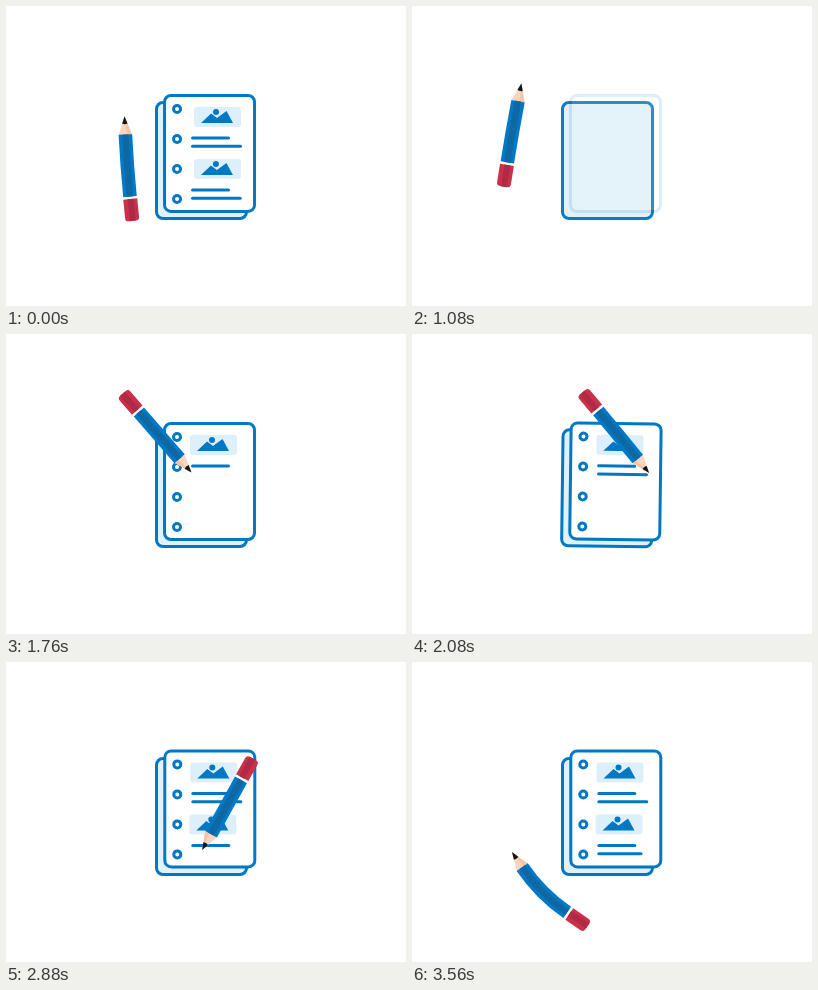
Recreate the animation shown at these times as an HTML page. Size 400 by 300 pixels, loop 3.6 s.

```html
<!DOCTYPE html>
<html lang="en">
<head>
<meta charset="utf-8">
<title>Pencil and notebook</title>
<style>
  html, body { margin: 0; width: 100%; height: 100%; overflow: hidden; background: #fff; }
  svg { display: block; width: 100vw; height: 100vh; }
  .ink { stroke: #0078c3; stroke-width: 3; }
  .line { stroke-linecap: round; }
</style>
</head>
<body>
<svg viewBox="0 0 400 300">
  <defs>
    <g id="picture">
      <rect width="47" height="20" rx="3" fill="#ddeffb"/>
      <path d="M7 16 L17 6.5 L23 11 L32.5 4 L39 16Z" fill="#0078c3"/>
      <circle cx="22" cy="5" r="3" fill="#0078c3"/>
    </g>
  </defs>
  <g id="notebook">
    <rect id="back" class="ink" x="150.5" y="96.5" width="90" height="116" rx="6.5" fill="#e0f1fa"/>
    <g id="front">
      <rect class="ink" x="158.5" y="89.5" width="90" height="116" rx="6.5" fill="#fff"/>
      <g id="holes" class="ink" fill="#fff"></g>
      <g id="pictures"></g>
      <g id="lines" class="ink line"></g>
    </g>
  </g>
  <g id="pencil">
    <g id="eraser">
      <rect x="-7" y="-1" width="14" height="4" fill="#fff"/>
      <path d="M-7 2.5 H7 V21 Q7 24.5 3.5 24.5 H-3.5 Q-7 24.5 -7 21Z" fill="#c9304a"/>
      <path d="M-2.5 2.5 H3.5 V24.5 H-2.5Z" fill="#b02a45"/>
    </g>
    <g id="tip">
      <path d="M-6.7 .4 L0 -18 L6.7 .4Z" fill="#fbd5bd"/>
      <path d="M2 .4 L0 -18 L6.7 .4Z" fill="#f3c4a8"/>
      <path d="M-2.7 -10.8 L0 -18.2 L2.7 -10.8 Q0 -9.8 -2.7 -10.8Z" fill="#151515"/>
    </g>
    <g id="body" fill="none">
      <path stroke="#0078c8" stroke-width="13.6"/>
      <path stroke="#1068a2" stroke-width="6.4"/>
    </g>
  </g>
</svg>
<script>
const LOOP = 3600, INTRO = 360, LEAVE = 3560;
const MARGIN = 186.5, NIB = 49, HALF = 31;

const $ = id => document.getElementById(id);
const place = (el, transform) => el.setAttribute('transform', transform);
const fade = (el, value) => el.setAttribute('opacity', value);
const radians = degrees => degrees * Math.PI / 180;

const ramp = (t, from, to) => Math.min(1, Math.max(0, (t - from) / (to - from)));
const easeIn = u => u * u;
const easeOut = u => 1 - (1 - u) ** 11;
const easeInOut = u => u < .5 ? 4 * u ** 3 : 1 - 4 * (1 - u) ** 3;
const between = (t, from, to) => easeInOut(ramp(t, from, to));

function add(parent, name, attrs) {
  const el = document.createElementNS('http://www.w3.org/2000/svg', name);
  for (const key in attrs) el.setAttribute(key, attrs[key]);
  return parent.appendChild(el);
}

const holes = [0, 1, 2, 3].map(i => add($('holes'), 'circle', { cx: 171, cy: 103 + 30 * i, r: 3.5 }));

// Each block is a picture with a short and a long line under it.
function makeBlock(index, start, angle, longEnd) {
  const top = 101 + 52 * index;
  const makeLine = (y, from, to, end) => ({
    y, from, to, end,
    el: add($('lines'), 'line', { x1: MARGIN, y1: y, y2: y })
  });
  return {
    top, start, angle,
    picture: add($('pictures'), 'use', { href: '#picture' }),
    lines: [
      makeLine(top + 31, start, start + 160, 222.5),
      makeLine(top + 39.4, start + 300, start + 500, longEnd)
    ]
  };
}
const blocks = [makeBlock(0, 1480, 139, 234.5), makeBlock(1, 2640, 209, 228.5)];

// A pose is [centre x, centre y, bearing, bend].
const write = (x, y, angle) =>
  [x - NIB * Math.sin(radians(angle)), y - 2 + NIB * Math.cos(radians(angle)), angle, 0];

const move = (from, to, pose, ease = easeInOut, swing = [0, 0, 0, 0]) => ({ from, to, pose, ease, swing });

function writeBlock({ lines: [short, long], angle }) {
  return [
    move(short.from, short.to, write(short.end, short.y, angle)),
    move(short.to, long.from, write(MARGIN - 1.5, long.y, angle)),
    move(long.from, long.to, write(long.end, long.y, angle))
  ];
}
const blockStart = ({ lines, angle }) => write(MARGIN - 1.5, lines[0].y, angle);

const [first, second] = blocks;
const moves = [
  move(520, 880, [100.5, 124, 0, 0]),
  move(940, first.start, blockStart(first), easeInOut, [-16, 18, 0, 8]),
  ...writeBlock(first),
  move(1980, 2620, blockStart(second), easeInOut, [72, -21, 10, 19]),
  ...writeBlock(second),
  move(3140, LEAVE, [133.3, 231.5, 313, 22], easeIn),
  move(LEAVE, 3800, [120, 149, 362, 0], easeOut)
];

function pencilPose(t) {
  let pose = [100.5, 131, 0, 0];
  for (const { from, to, pose: target, ease, swing } of moves) {
    if (t <= from) break;
    const k = ease(ramp(t, from, to)), arc = Math.sin(Math.PI * k);
    pose = pose.map((value, i) => value + (target[i] - value) * k + swing[i] * arc);
  }
  return pose;
}

function drawNotebook(t) {
  const settle = easeOut(ramp(t, LEAVE, 3800));
  const tilt = 12.4 * Math.sin(Math.PI * ramp(t, 2040, 2560)) ** 2;
  const nudge = ramp(t, 2500, 2560) * (1 - settle);

  place($('notebook'), `rotate(${tilt} 208 142)`);
  place($('front'), `translate(${nudge * .3} ${nudge * -.6})`);
  fade($('back'), ramp(t, 920, 1088));
  fade($('front'), ramp(t, 1060, 1220));
  holes.forEach((hole, i) => fade(hole, ramp(t, 1200 + i * 40, 1280 + i * 40)));

  blocks.forEach(({ picture, top, start, lines }, i) => {
    place(picture, `translate(${184 + 4.6 * settle - i * nudge} ${top})`);
    fade(picture, ramp(t, start - 80, start + 40));
    for (const { el, from, to, end } of lines) {
      const finish = end === second.lines[1].end ? end + 6.5 * settle : end;
      el.setAttribute('x2', MARGIN + (finish - MARGIN) * between(t, from, to));
      fade(el, t > from ? 1 : 0);
    }
  });
}

function drawPencil(t) {
  const [x, y, bearing, bend] = pencilPose(t);
  const half = (HALF + bend * .045) * ramp(t, INTRO, 600);
  const turn = 90 * (1 - between(t, 500, 820));
  const reach = half * Math.cos(radians(turn)) + 6.8 * Math.sin(radians(turn));
  const control = -half * Math.tan(radians(bend / 2));

  place($('pencil'), `translate(${x} ${y}) rotate(${bearing})`);
  place($('body'), `rotate(${turn})`);
  for (const path of $('body').children)
    path.setAttribute('d', `M0 ${half} Q${control} 0 0 ${-half}`);
  place($('tip'), `translate(0 ${-reach}) rotate(${bend / 2}) scale(${ramp(t, 400, 554)})`);
  place($('eraser'), `translate(0 ${reach}) rotate(${-bend / 2}) scale(${between(t, 640, 840)})`);
}

function draw(now) {
  const phase = now % LOOP;
  const t = phase < INTRO ? phase + LOOP : phase;
  drawNotebook(t);
  drawPencil(t);
}

const start = performance.now();
function tick() {
  draw(performance.now() - start);
  requestAnimationFrame(tick);
}
tick();
</script>
</body>
</html>
```
